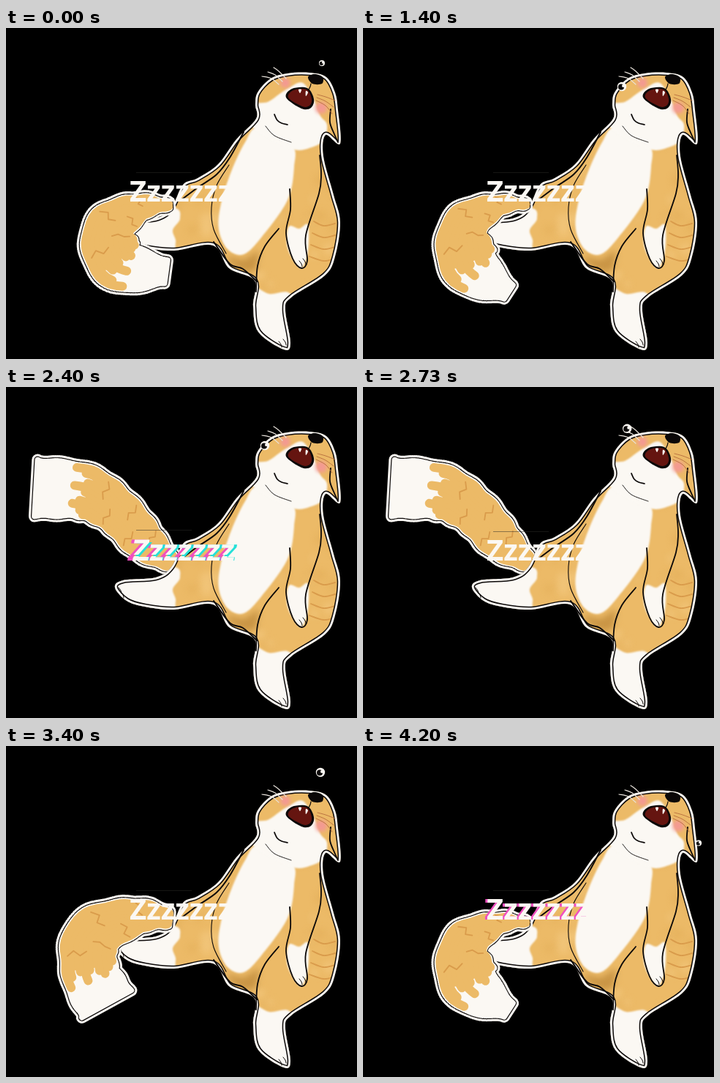
An HTML page with a canvas for the animation above (4270 ms loop, 480 by 452 pixels).

```html
<!DOCTYPE html>
<html lang="en">
<head>
<meta charset="utf-8">
<title>Snoring cat</title>
<style>
html, body { margin: 0; width: 100%; height: 100%; overflow: hidden; background: #000; }
canvas { display: block; }
</style>
</head>
<body>
<canvas id="stage" width="480" height="452"></canvas>
<script>
const ctx = document.getElementById('stage').getContext('2d');
const LOOP = 4270, STEP = 1000 / 15;
const WHITE = '#fbf8f3', FUR = '#ecba67', STRIPE = '#d99b4b', INK = '#0b0808';
const PINK = '#f04fc0', CYAN = '#25e0d8';

const points = s => s.split(' ').map(p => p.split(',').map(Number));

// Smooth curve through "x,y x,y ..." points.
function curve(text, closed) {
  const p = points(text), n = p.length, path = new Path2D();
  const at = i => closed ? p[(i + n) % n] : p[Math.max(0, Math.min(n - 1, i))];
  path.moveTo(...p[0]);
  for (let i = 0; i < n - (closed ? 0 : 1); i++) {
    const [a, b, c, d] = [at(i - 1), at(i), at(i + 1), at(i + 2)];
    path.bezierCurveTo(b[0] + (c[0] - a[0]) / 6, b[1] + (c[1] - a[1]) / 6,
      c[0] - (d[0] - b[0]) / 6, c[1] - (d[1] - b[1]) / 6, ...c);
  }
  return path;
}

function blob(text, color) {
  ctx.fillStyle = color;
  ctx.fill(curve(text, true));
}

function stroke(path, width, color) {
  ctx.strokeStyle = color;
  ctx.lineWidth = width;
  ctx.stroke(path);
}

const line = (text, width = 1.5, color = INK) => stroke(curve(text), width, color);

function disc(x, y, r, color) {
  ctx.fillStyle = color;
  ctx.beginPath();
  ctx.arc(x, y, r, 0, 7);
  ctx.fill();
}

function soft(radius, draw) {
  ctx.filter = `blur(${radius}px)`;
  draw();
  ctx.filter = 'none';
}

// Tail spines from base to tip: x, y, half width
const spines = {
  curled: points('224,242,12 182,246,25 142,276,41 156,322,43 220,333,23'),
  low: points('224,241,11 184,243,21 140,272,38 148,325,45 200,361,18'),
  side: points('224,236,18 180,233,30 120,258,43 115,308,44 138,353,46'),
  out: points('230,238,16 180,229,32 108,235,42 93,293,47 97,351,42'),
  high: points('226,240,18 190,211,33 152,170,37 106,143,43 40,138,46')
};

// Point on a spine at 0..1, shifted sideways by half widths less an inset.
function spot(spine, t, side = 0, inset = 0) {
  const last = spine.length - 1, at = i => spine[Math.max(0, Math.min(last, i))];
  const i = Math.min(last - 1, Math.floor(t * last)), u = t * last - i;
  const [a, b, c, d] = [at(i - 1), at(i), at(i + 1), at(i + 2)];
  const [x, y, r] = b.map((v, k) => v + u / 2 * (c[k] - a[k] +
    u * (2 * a[k] - 5 * v + 4 * c[k] - d[k] + u * (3 * (v - c[k]) + d[k] - a[k]))));
  const [dx, dy] = [0, 1].map(k => c[k] - a[k] + 2 * u * (2 * a[k] - 5 * b[k] + 4 * c[k] - d[k]) +
    3 * u * u * (3 * (b[k] - c[k]) + d[k] - a[k]));
  const shift = side * Math.max(0, r - inset + Math.sin(t * 45)) / Math.hypot(dx, dy);
  return [x - dy * shift, y + dx * shift];
}

function drawTail(spine) {
  const corner = 8;
  for (const [inset, color] of [[0, WHITE], [3, INK], [4.2, WHITE]]) {
    const ribs = new Path2D();
    for (let t = 0; t <= 1; t += .008) {
      ribs.moveTo(...spot(spine, t, -1, corner));
      ribs.lineTo(...spot(spine, t, 1, corner));
    }
    stroke(ribs, 2 * (corner - inset), color);
  }
  soft(.7, () => {
    for (let side = -1; side <= 1; side += .2) {
      const lane = new Path2D(), end = .76 + .05 * Math.sin(side * 8);
      for (let t = .02; t < end; t += .02) lane.lineTo(...spot(spine, t, side, 12));
      stroke(lane, 12, FUR);
    }
  });
  for (let k = 0; k < 5; k++) {
    const mark = new Path2D(), from = k % 2 ? -.7 : .05;
    for (let j = 0; j < 4; j++)
      mark.lineTo(...spot(spine, .22 + k * .1 + j % 2 * .025, from + j * .2));
    stroke(mark, 1.8, STRIPE);
  }
}

function seeded(seed) {
  return () => (seed = seed * 16807 % 2147483647) / 2147483647;
}

function drawBody() {
  const shape = curve('341,105 344,88 362,69 385,62 415,61 438,67 450,88 454,112 457,158 437,146 ' +
    '434,175 448,228 457,265 450,312 436,338 390,368 382,385 389,430 380,439 345,415 338,380 340,345 ' +
    '305,328 283,297 230,304 190,300 165,292 149,274 160,264 205,260 226,246 242,214 262,205 290,186 ' +
    '315,152 342,124', true);
  ctx.save();
  ctx.clip(shape);
  ctx.fillStyle = FUR;
  ctx.fill(shape);
  soft(4, () => {
    const random = seeded(11);
    for (let i = 0; i < 60; i++)
      disc(230 + 230 * random(), 150 + 220 * random(), 4 + 7 * random(),
        i % 2 ? 'rgba(248,212,145,.35)' : 'rgba(220,165,75,.25)');
    blob('302,312 325,316 345,305 340,331 318,329', '#c99545');
  });
  soft(1.2, () => {
    blob('345,136 327,156 308,196 294,240 291,275 303,302 325,309 350,285 385,235 394,190 391,160', WHITE);
    blob('336,106 358,101 374,90 388,81 406,75 421,98 430,120 439,132 435,152 418,163 390,165 338,136', WHITE);
    blob('140,250 226,245 238,260 228,276 232,293 220,312 140,310', WHITE);
    blob('330,357 360,363 392,367 400,445 330,445', WHITE);
    blob('387,271 401,274 413,269 413,305 404,328 392,315 384,295', WHITE);
  });
  for (let i = 0; i < 4; i++) {
    const y = 264 + 16 * i;
    line(`${421 - 2 * i},${y} 434,${y + 6} 450,${y + 3}`, 1.8, STRIPE);
  }
  stroke(shape, 8.6, INK);
  stroke(shape, 5.6, WHITE);
  ctx.restore();

  // Limbs and belly folds
  line('325,142 306,177 288,200 262,218 238,236', 2);
  line('305,187 288,215 281,245 284,275 301,308', 1.1);
  line('388,220 389,248 383,280 392,315 404,328 412,318 410,283 428,226 431,200 429,174', 1.8);
  line('373,274 354,298 344,325 342,360', 1.8);
  line('284,292 306,322 324,329 343,346', 2);
  line('355,134 367,147 390,156', .9);

  // Toes
  for (const [x, y] of [[401, 318], [406, 315], [373, 428], [379, 425], [154, 274], [157, 280]])
    line(`${x},${y} ${x + 3},${y + 4} ${x + 4},${y + 8}`, 1);
}

function drawFace() {
  soft(2.5, () => {
    disc(382, 75, 7, '#f39a91');
    disc(431, 109, 8, '#f39a91');
  });
  blob('383,95 391,83 412,82 421,97 417,109 404,110', INK);
  blob('386,95 393,85 411,84 418,97 415,106 405,107', '#651510');
  blob('400,84 404,84 402,89', WHITE);
  blob('410,86 413,88 410,93', WHITE);
  line('367,118 371,126 377,130 385,132', 1.7);
  blob('413,67 422,63 433,67 432,76 419,76', INK);
  line('417,76 416,80 414,84', 1.2);
  line('444,111 443,129 449,145 454,156', 1.8);
  for (let i = 0; i < 3; i++) {
    line(`${350 + 8 * i},${66 - 6 * i} ${363 + 5 * i},${69 - 5 * i} ${373 + 5 * i},${77 - 4 * i}`, 1.2, '#e9e3dc');
    line(`${424 + i},${99 - 4 * i} 437,${106 - 6 * i} ${446 + 2 * i},${117 - 9 * i}`, .9, '#b66c3d');
  }
}

// Time, x, y
const flight = points('0,432,48 800,366,60 1200,354,80 2450,354,80 3000,368,35 3400,430,36 3730,466,96 4270,458,138');

function drawFly(t) {
  const i = flight.findIndex(k => k[0] > t), a = flight[i - 1], b = flight[i];
  const f = (t - a[0]) / (b[0] - a[0]);
  const size = t < 1000 || t > 4000 ? .65 : 1;
  ctx.save();
  ctx.translate(a[1] + (b[1] - a[1]) * f, a[2] + (b[2] - a[2]) * f);
  ctx.scale(size, size);
  disc(0, 0, 6.2, WHITE);
  disc(-1, .5, 4, INK);
  disc(2, -1, 2, WHITE);
  ctx.restore();
}

// Each glitch lasts two frames. Layers: shift, colour, slant, top, bottom
const plain = { bar: 197, layers: [[0, WHITE, 0, 200, 240]] };
const glitches = [
  { at: 3, bar: 195, layers: [[-4, PINK, -.2, 200, 240], [4, CYAN, -.2, 212, 240], [0, WHITE, -.2, 200, 229], [3, WHITE, -.2, 231, 240]] },
  { at: 12, bar: 213, layers: [[-3, PINK, -.2, 200, 240], [2, WHITE, -.1, 208, 221], [5, WHITE, -.1, 221, 226], [1, WHITE, 0, 230, 240]] },
  { at: 23, bar: 211, layers: [[2, WHITE, 0, 209, 213], [0, WHITE, -.08, 216, 240]] },
  { at: 28, bar: 204, layers: [[-3, '#c76cae', -.15, 200, 240], [0, WHITE, -.12, 200, 240]] },
  { at: 30, bar: 197, layers: [[-3, PINK, 0, 200, 240], [0, WHITE, 0, 200, 240]] }
];

function drawText(frame) {
  const beat = frame % 33;
  const { bar, layers } = glitches.find(g => beat === g.at || beat === g.at + 1) || plain;
  ctx.fillStyle = 'rgba(45,45,40,.5)';
  ctx.fillRect(178, bar, 76, 1);
  ctx.font = 'bold 40px "Open Sans", "Noto Sans", sans-serif';
  for (const [dx, color, slant, top, bottom] of layers) {
    ctx.save();
    ctx.beginPath();
    ctx.rect(150, top, 190, bottom - top);
    ctx.clip();
    ctx.transform(1, 0, slant, 1, 169 + dx, 236.5);
    ctx.fillStyle = color;
    ctx.fillText('Zzzzzzz', 0, 0);
    ctx.restore();
  }
}

const poses = [[0, 'curled'], [1200, 'low'], [1600, 'side'], [1800, 'out'], [2130, 'high'],
  [3130, 'out'], [3400, 'side'], [3860, 'low']];

function draw(frame) {
  const t = frame * STEP;
  const pose = poses.filter(p => p[0] <= t + 1).pop()[1];
  const parts = [() => drawTail(spines[pose]), drawBody];
  const tailBehind = pose === 'out' || pose === 'high';
  ctx.fillStyle = '#000';
  ctx.fillRect(0, 0, 480, 452);
  ctx.lineCap = ctx.lineJoin = 'round';
  (tailBehind ? parts : parts.reverse()).forEach(part => part());
  drawFace();
  drawFly(t);
  drawText(frame);
}

let shown = -1;
const start = performance.now();
function tick() {
  const t = (performance.now() - start) % LOOP;
  const frame = Math.min(63, Math.floor((t + 4) / STEP));
  if (frame !== shown) draw(shown = frame);
  requestAnimationFrame(tick);
}
tick();
</script>
</body>
</html>
```
